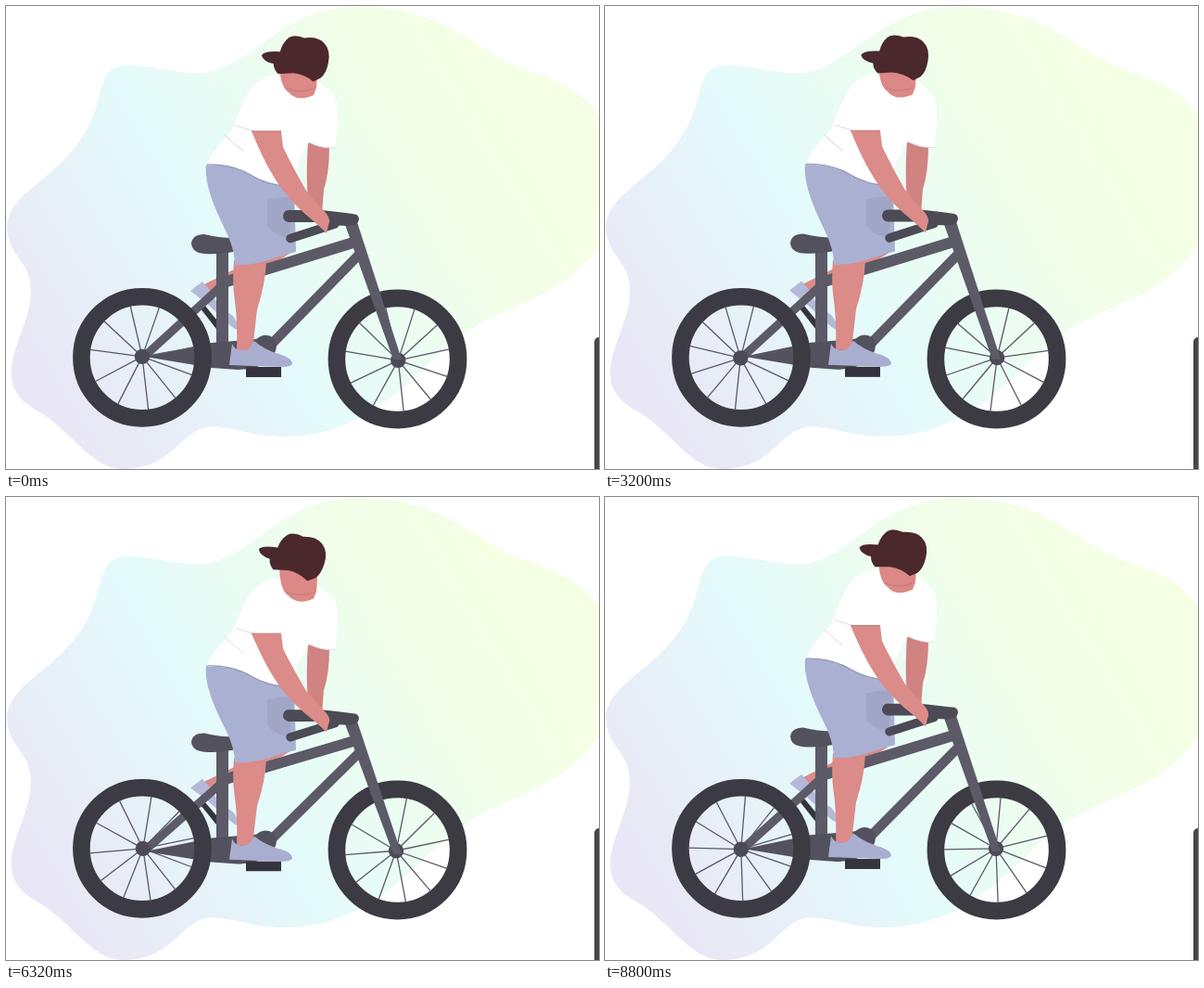
Write an HTML page that moves like this. It is 640 px wide and 499 px high and loops after 8870 ms.

```html
<!DOCTYPE html>
<html lang="en">
<head>
<meta charset="utf-8">
<title>Cyclist</title>
<style>
  html, body { margin: 0; width: 100%; height: 100%; overflow: hidden; background: #fff; }
  svg { display: block; width: 100%; height: 100%; }
</style>
</head>
<body>
<svg viewBox="0 0 640 499">
  <defs>
    <linearGradient id="sky" gradientUnits="userSpaceOnUse" x1="60" y1="420" x2="560" y2="120">
      <stop offset="0" stop-color="#e9e7f5"/>
      <stop offset=".4" stop-color="#e4fbfb"/>
      <stop offset=".8" stop-color="#f2fee8"/>
      <stop offset="1" stop-color="#f4ffe4"/>
    </linearGradient>
  </defs>

  <path fill="url(#sky)" d="M1 238C2 205 45 190 75 152C113 104 92 64 132 64C165 64 200 78 225 70C275 55 300 2 378 1
    C465 1 495 36 540 60C580 80 640 80 660 165C670 245 620 288 580 310C540 330 505 340 470 372
    C425 415 380 464 300 464C265 464 235 450 215 454C185 462 180 499 125 499C90 498 70 455 30 434
    C-8 412 7 378 18 348C45 274 2 280 1 238Z"/>
  <rect x="635" y="357" width="14" height="160" rx="5" fill="#48484a"/>
  <g id="front"/>

  <g id="body">
    <!-- far leg -->
    <path fill="#35343d" d="M209 325L214 322L228 339L227 348Z"/>
    <path fill="#db8b88" d="M313 262L298 272L250 293L221 308L214 300L246 284L262 272Z"/>
    <path fill="#b4b9da" d="M199 307L212 297L219 305Q226 322 245 334L254 348Q250 351 243 345L216 320Z"/>

    <!-- frame -->
    <g fill="none" stroke="#5c5a67">
      <path stroke-width="9" d="M150 377L239 296"/>
      <path stroke-width="12" d="M378 254L238 297"/>
      <path stroke-width="10.500" d="M382 267L285 366"/>
      <path stroke-width="13" d="M233.500 262V388"/>
    </g>
    <path fill="#53515d" d="M150 378L222 363L270 359Q280 351 289 358Q295 365 289 376Q280 391 250 392L222 390Z"/>
    <path fill="#5c5a67" d="M366 236L379 233L427 381L418 381Z"/>
    <path fill="#53515d" d="M200 256Q201 246 214 246Q230 250 245 250V265Q230 268 214 267Q201 266 200 256Z"/>
    <rect x="259" y="389" width="38" height="11" fill="#35343d"/>

    <!-- near leg and shorts -->
    <path fill="#db8b88" d="M246 274H281Q280 300 271 327L266 371H249Q250 340 247 318Q244 300 246 274Z"/>
    <path fill="#a9aed1" d="M244 364Q248 374 262 370L268 361Q278 370 294 375Q309 379 309 386Q307 389 298 389L241 387Z"/>
    <path fill="#aab0d2" d="M216 171Q240 170 262 181Q290 196 311 194L313 265Q300 268 289 272Q268 280 247 279Q247 262 236 240Q213 194 216 171Z"/>
    <path fill="#a1a6c7" d="M311 206Q296 205 282 209V236Q287 247 306 250Z"/>

    <!-- far arm and handlebar -->
    <path fill="#d08381" d="M326 146L349 151Q349 180 343 198L341 224L327 218Q323 190 326 146Z"/>
    <path fill="#4b4a55" d="M305 220H340Q360 222 374 224Q381 224 381 230Q380 237 370 237L345 236L334 233H305Q299 232 299 226Q300 220 305 220Z"/>
    <path fill="none" stroke="#4b4a55" stroke-width="9.500" stroke-linecap="round" d="M307 250.500L355 235"/>

    <!-- shirt, near arm and face -->
    <path fill="#fff" d="M295 72Q270 78 262 93Q251 113 245 132L228 152Q219 163 217 172Q242 170 262 181Q285 195 310 194Q310 172 327 147Q341 154 355 153Q359 128 358 108Q354 90 336 82Z"/>
    <path fill="none" stroke="#dcdce2" d="M248 129L267 135M236 139Q249 151 257 157M327 147Q341 154 355 153"/>
    <path fill="none" stroke="#8f94b5" stroke-width="1.200" d="M217 171Q242 170 262 181Q285 195 309 194"/>
    <path fill="#db8b88" d="M265 135H297L299 152Q309 173 324 199L346 224Q351 231 348 236L346 245Q340 239 331 231Q314 218 296 195Q284 177 276 160Q270 147 265 135Z"/>
    <path fill="none" stroke="#c4777a" d="M265 135H297"/>
    <path fill="#db8886" d="M295 58H337L335 88L332 96Q314 104 305 93Q295 87 295 58Z"/>
    <path fill="none" stroke="#c6767a" d="M303 89Q317 95 332 89"/>
  </g>

  <path id="hair" fill="#4a282b" d="M276 53Q279 48 296 49Q298 40 305 34Q311 30 322 34Q336 32 343 39Q351 47 348 61Q346 72 340 77L332 81Q322 73 310 72L294 73Q289 68 289 62Q278 60 276 53Z"/>
  <g id="rear"/>
</svg>
<script>
  const LOOP = 8870, PERIOD = 1942, START = 0.19, SPOKES = 11, RIM = 57;
  const find = selector => document.querySelector(selector);

  // The hub sits slightly off the axle, so it wobbles as the wheel turns.
  function buildWheel(id, x, y, hubX, hubY) {
    let spokes = '';
    for (let i = 0; i < SPOKES; i++) {
      const step = 2 * Math.PI * i / SPOKES;
      const angle = step - 0.32 + 0.09 * Math.cos(step);
      spokes += `M${hubX} ${hubY}L${RIM * Math.sin(angle)} ${-RIM * Math.cos(angle)}`;
    }
    const wheel = find(id);
    wheel.setAttribute('transform', `translate(${x} ${y})`);
    wheel.innerHTML = `
      <circle r="65.6" fill="none" stroke="#3c3a43" stroke-width="18.6"/>
      <g class="spin">
        <path d="${spokes}" stroke="#5b5965" stroke-width="1.3"/>
        <circle cx="${hubX}" cy="${hubY}" r="8.2" fill="#4c4a55"/>
      </g>`;
  }
  buildWheel('#front', 422.5, 380.5, 0.8, 1.4);
  buildWheel('#rear', 147, 378.8, 0, -0.9);

  const spinners = document.querySelectorAll('.spin');
  const body = find('#body'), hair = find('#hair');

  function draw(now) {
    const turn = (now % LOOP) / PERIOD;
    const swing = Math.sin(Math.PI * (turn + START)) ** 2;
    const dip = 1.12 * swing ** 2 - 0.12;
    const nod = 1.4 * swing - 0.4;
    spinners.forEach(s => s.setAttribute('transform', `rotate(${360 * turn})`));
    // The bike and rider squash towards the ground; the head nods with them.
    body.setAttribute('transform', `translate(0 497) scale(1 ${1 - 0.036 * dip}) translate(0 -497)`);
    hair.setAttribute('transform', `translate(${-4 * nod} ${8.5 * nod}) rotate(${7 * nod} 318 56)`);
  }

  const begin = performance.now();
  function tick() {
    draw(performance.now() - begin);
    requestAnimationFrame(tick);
  }
  tick();
</script>
</body>
</html>
```
